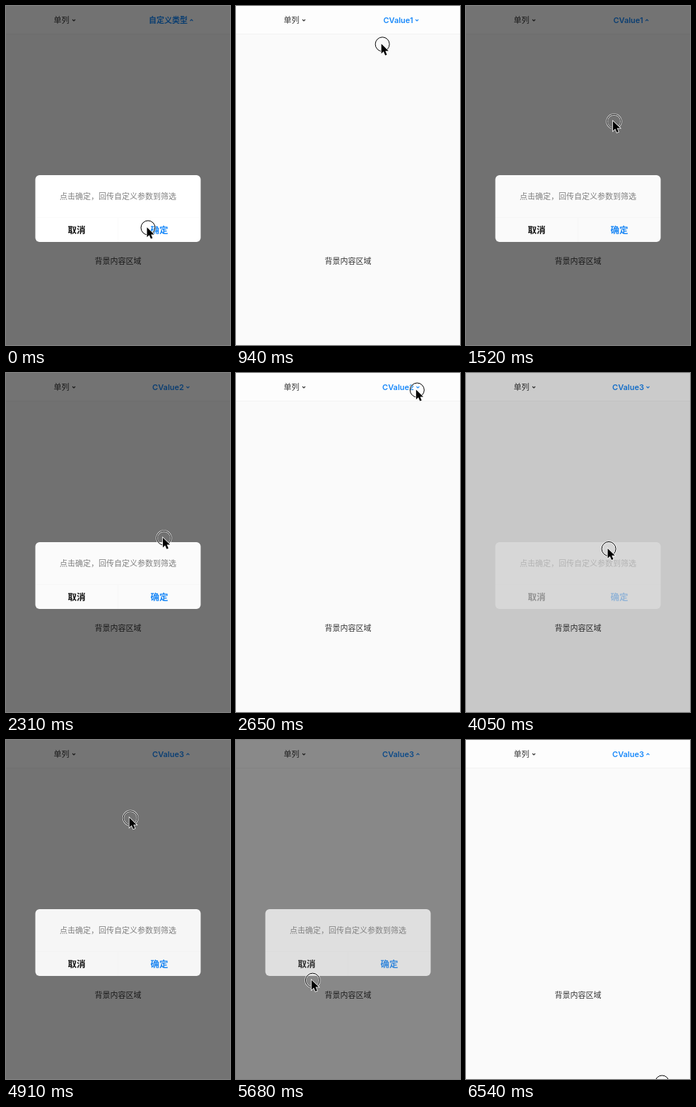
Write an HTML page that moves like this. It is 317 px wide and 477 px high and loops after 6680 ms.

```html
<!DOCTYPE html>
<html lang="zh-CN">
<head>
<meta charset="utf-8">
<title>Filter dialog</title>
<style>
  html, body { margin: 0; width: 100%; height: 100%; overflow: hidden; background: #fafafa; }
  svg { display: block; width: 317px; height: 477px; }
  text { font: 11px Inter, "Noto Sans CJK SC", "Noto Sans CJK", sans-serif; text-anchor: middle; fill: #333; }
  .strong { font-weight: 600; }
  .blue { fill: #1989fa; }
  .button { font-size: 12.5px; font-weight: 600; }
  .caret { fill: none; stroke: #333; stroke-width: 1.1; }
</style>
</head>
<body>
<svg viewBox="0 0 317 477">
  <rect width="317" height="477" fill="#fafafa"/>
  <rect width="317" height="39" fill="#fdfdfd"/>
  <rect y="39" width="317" height="1" fill="#f2f2f2"/>
  <text x="78.5" y="24">单列</text>
  <path class="caret" d="M94 19l2 2 2-2"/>
  <text id="label" class="strong blue" x="229.5" y="24"></text>
  <path id="caret" class="caret" style="stroke:#1989fa" d="M-2-1L0 1 2-1"/>
  <text x="158.5" y="363">背景内容区域</text>

  <rect id="mask" width="317" height="477" fill-opacity=".55"/>
  <g id="card">
    <rect x="41.5" y="238" width="234" height="94" rx="6" fill="#fff"/>
    <path d="M41.5 297.5h234M158.5 298v34" stroke="#000" stroke-opacity=".015"/>
    <text x="158.5" y="271.5" style="fill:#808080">点击确定，回传自定义参数到筛选</text>
    <text class="button" x="100" y="320" style="fill:#111">取消</text>
    <text class="button blue" x="217" y="320">确定</text>
  </g>

  <g id="cursor">
    <circle r="10" fill="none" stroke="#fff" stroke-opacity=".8" stroke-width="2.4"/>
    <circle r="10" fill="none" stroke="#000"/>
    <path d="M-1.5-.5v13.8l3.2-3 2.3 5.3 2.4-1-2.2-5.2h4.5z" stroke="#fff" stroke-width="1.5" paint-order="stroke"/>
  </g>
</svg>
<script>
const LOOP = 6680, FADE = 200;

// The cursor leaves, arrives and clicks; clicks close and open the dialog in turn.
const stops = [
  { leave: -2, arrive: -1, x: 201, y: 312, click: 220, label: "CValue1" },
  { leave: 580, arrive: 1290, x: 208, y: 19, click: 1359 },
  { leave: 1400, arrive: 2000, x: 211, y: 311, click: 2280, label: "CValue2" },
  { leave: 2265, arrive: 2720, x: 256.5, y: 23, click: 3079 },
  { leave: 3180, arrive: 3700, x: 200, y: 316, click: 3882, label: "CValue3" },
  { leave: 4000, arrive: 4620, x: 209, y: 14, click: 4759 },
  { leave: 4850, arrive: 5390, x: 100, y: 331, click: 5578 },
  { leave: 5667, arrive: 6540, x: 277.5, y: 482 }
];

const [label, caret, mask, card, cursor] =
  ["label", "caret", "mask", "card", "cursor"].map(id => document.getElementById(id));

const easeOut = u => 1 - (1 - u) ** 3;
const mix = (a, b, u) => a + (b - a) * u;

function drawDialog(t) {
  const clicked = stops.filter(stop => stop.click <= t);
  const last = clicked.at(-1);
  const open = clicked.length % 2 === 0;
  const progress = last ? Math.min(1, (t - last.click) / FADE) : 1;
  const hidden = open ? 1 - progress : progress;
  mask.setAttribute("opacity", 1 - hidden ** 2.7);
  card.setAttribute("opacity", 1 - hidden ** 2);

  label.textContent = clicked.findLast(stop => stop.label)?.label ?? "自定义类型";
  const caretX = 229.5 + label.getComputedTextLength() / 2 + 5.5;
  const flip = !open && last.label ? 1 : -1; // stays up after cancelling
  caret.setAttribute("transform", `translate(${caretX} 20) scale(1 ${flip})`);
}

function drawCursor(t) {
  const index = stops.findLastIndex(stop => stop.leave <= t);
  const to = stops[index], from = stops[index - 1] ?? to;
  const u = easeOut(Math.min(1, (t - to.leave) / (to.arrive - to.leave)));
  cursor.setAttribute("transform", `translate(${mix(from.x, to.x, u)} ${mix(from.y, to.y, u)})`);
}

function draw() {
  const t = performance.now() % LOOP;
  drawDialog(t);
  drawCursor(t);
  requestAnimationFrame(draw);
}
draw();
</script>
</body>
</html>
```
